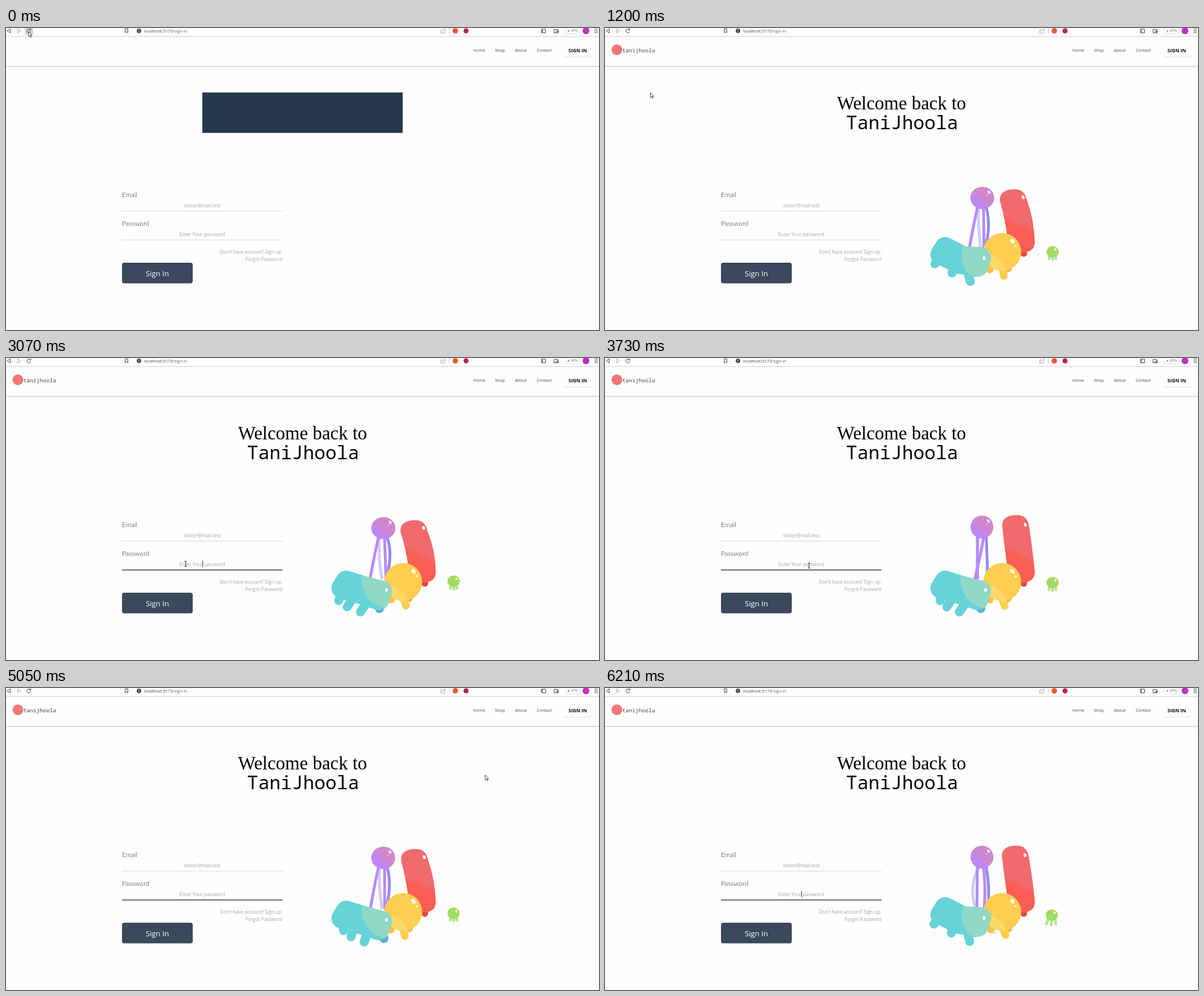
An HTML page for the animation above (6.31 s loop, 1048 by 534 pixels).

```html
<!DOCTYPE html>
<html lang="en">
<head>
<meta charset="utf-8">
<title>Sign in</title>
<style>
  html, body { margin: 0; width: 100%; height: 100%; overflow: hidden; background: #fefefe; }
  svg { display: block; width: 100vw; height: 100vh; }
  text { font-family: "Open Sans", "Noto Sans", sans-serif; white-space: pre; }
  .mono { font-family: "Noto Sans Mono", monospace; font-weight: 300; }
  .label { font: 300 11.8px Lato, sans-serif; fill: #2b2733; }
  .hint { font-size: 8.4px; fill: #9ca3af; }
  .nav { font-size: 7.4px; fill: #444; }
  .line { fill: none; stroke: #444; }
  .pale { stroke: #aaa; }
  .leg { fill: none; stroke-linecap: round; }
  .round { stroke-width: 36; stroke-linejoin: round; }
</style>
</head>
<body>
<svg viewBox="0 0 1048 534">
  <defs>
    <linearGradient id="redFill" gradientUnits="userSpaceOnUse" x1="732" y1="342" x2="728" y2="351">
      <stop stop-color="#f16a6d"/><stop offset="1" stop-color="#fa5d53"/>
    </linearGradient>
    <linearGradient id="purpleFill" x1=".2" y1=".8" x2=".5" y2=".5">
      <stop offset=".5" stop-color="#bf87f4"/><stop offset="1" stop-color="#ce87cd"/>
    </linearGradient>
    <linearGradient id="greenFill" x1="0" y1="1" x2="1" y2="0">
      <stop offset=".5" stop-color="#9fdd66"/><stop offset="1" stop-color="#b9d94a"/>
    </linearGradient>
    <clipPath id="titleBox"><rect x="347" y="108" width="354" height="84"/></clipPath>
    <clipPath id="ballClip"><circle cx="702" cy="396" r="33.5"/></clipPath>
    <mask id="tealMask" maskUnits="userSpaceOnUse" x="560" y="350" width="140" height="120">
      <path id="tealEdge" class="round" fill="#fff" stroke="#fff"/>
    </mask>
  </defs>

  <!-- browser bar -->
  <path d="M0 15.2H1048" stroke="#d4d4d6" stroke-width="1.2"/>
  <rect id="hover" x="33" y="-4" width="15" height="16" rx="2" fill="#d3d5d9"/>
  <path class="line" d="M7.5 1.5V8.5L2 5Z"/>
  <path class="line pale" d="M20.5 1.5V8.5L26 5Z"/>
  <path class="line" d="M43 3A3.4 3.4 0 1 0 43.6 6M43.8 1V3.7H41"/>
  <path class="line" d="M210.7 1.5H215.3V8.5L213 6.5L210.7 8.5Z"/>
  <circle cx="235" cy="5" r="3.9" fill="#444"/>
  <path d="M235 2.5V5.4M235 6.4V7.5" stroke="#fff"/>
  <text x="244" y="8" font-size="7.5" fill="#444">localhost:5173<tspan fill="#666">/sign-in</tspan></text>
  <path class="line pale" d="M771 3H768.5V9H775.5V7M770.5 6.5Q771 3.5 776 3.5M774 1L776.5 3.5L774 6"/>
  <path d="M783.5 0V10" stroke="#ccc"/>
  <circle cx="794" cy="5" r="4.8" fill="#f0552b"/>
  <circle cx="813" cy="5" r="4.5" fill="#b8234f"/>
  <path class="line" d="M946.5 2H953.5V8.5H946.5ZM948 2V8.5"/>
  <path class="line" d="M968.5 2.5H975V4H976V8.5H968.5ZM976 5.5H973V7H976"/>
  <rect x="988.5" y="-2" width="26" height="12.5" rx="6" fill="#fff" stroke="#ddd"/>
  <circle cx="994" cy="5" r="1.5" fill="#888"/>
  <text x="998" y="7.4" font-size="6.4" fill="#777">VPN</text>
  <circle cx="1025" cy="5" r="6" fill="#c02fc0"/>
  <path class="line" d="M1040 2H1046M1040 5H1046M1040 8H1046"/>

  <!-- site header -->
  <path d="M0 68H1048" stroke="#d9dadd" stroke-width="2"/>
  <g id="brand">
    <circle cx="21" cy="38.5" r="9.5" fill="#f27777"/>
    <text class="mono" x="30.5" y="43" font-size="9.7" fill="#444">tanijhoola</text>
  </g>
  <text class="nav" x="826" y="42">Home</text>
  <text class="nav" x="864" y="42">Shop</text>
  <text class="nav" x="899.5" y="42">About</text>
  <text class="nav" x="938" y="42">Contact</text>
  <rect x="986.5" y="30" width="49" height="22" rx="3" fill="#e2e2e4"/>
  <rect x="986" y="28" width="50" height="22.8" rx="3" fill="#fefefe"/>
  <text x="994" y="42.6" font-size="8.6" font-weight="700" fill="#111">SIGN IN</text>

  <!-- title -->
  <g clip-path="url(#titleBox)">
    <g id="title" text-anchor="middle">
      <text x="524" y="144" style="font:33px 'Liberation Serif',serif">Welcome back to</text>
      <text class="mono" x="525" y="179" font-size="33">TaniJhoola</text>
    </g>
    <rect id="cover" x="347" y="114" width="354" height="71.5" fill="#27374d"/>
  </g>

  <!-- form -->
  <text class="label" x="205" y="298.5">Email</text>
  <text class="hint" x="347" y="317" text-anchor="middle">visitor@mail.test</text>
  <path d="M205 323.7H488.5" stroke="#d3d5d9"/>
  <text class="label" x="205" y="349.5">Password</text>
  <text class="hint" x="347" y="367.5" text-anchor="middle">Enter Your password</text>
  <path id="field" d="M205 374.8H488.5"/>
  <path id="caret" d="M347.5 358.5V370" stroke="#333"/>
  <g class="hint" text-anchor="end">
    <text x="488.5" y="398.5">Don't have account! Sign up.</text>
    <text x="488.5" y="411.8">Forgot Password</text>
  </g>
  <rect x="205" y="415" width="125" height="36.5" rx="4" fill="#3b495c"/>
  <text x="267.5" y="439" font-size="13.2" fill="#fff" text-anchor="middle">Sign In</text>

  <!-- creatures -->
  <g id="art">
    <g class="leg" stroke-width="5">
      <path id="strand0" stroke="#cfccfa"/>
      <path id="strand1" stroke="#9289fa"/>
      <path id="strand2" stroke="#b78afa"/>
      <path id="strand3" stroke="#b78afa"/>
    </g>
    <ellipse id="head" fill="url(#purpleFill)"/>
    <g id="headShine" fill="#fff" opacity=".75">
      <ellipse cx="679" cy="291" rx="2.4" ry="3.3" transform="rotate(-35 679 291)"/>
      <circle cx="675.5" cy="296.5" r="1"/>
    </g>
    <path class="leg" d="M740 390V398.5" stroke="#dc4a47" stroke-width="12"/>
    <path id="red" fill="url(#redFill)"/>
    <ellipse id="redShine" rx="2.5" ry="3.4" fill="#fff"/>
    <ellipse id="puff" rx="5" ry="3" fill="#e8e6ea"/>
    <g class="leg" stroke-width="13.5">
      <path id="stub0" stroke="#f9b24c"/>
      <path id="stub1" stroke="#fbc048"/>
      <path id="stub2" stroke="#ffcd4f"/>
    </g>
    <circle cx="702" cy="396" r="33.5" fill="#ffcd4f"/>
    <circle cx="672" cy="440" r="39" fill="#fbd969" clip-path="url(#ballClip)"/>
    <g fill="#fff">
      <ellipse cx="720" cy="377" rx="3.3" ry="4.5" transform="rotate(-35 720 377)"/>
      <circle cx="726" cy="386" r="1.8"/>
    </g>
    <g class="leg" stroke="#67d3d8" stroke-width="16">
      <path id="foot3" stroke="#5eafd9"/>
      <path id="foot0"/><path id="foot1"/><path id="foot2"/>
    </g>
    <path id="teal" class="round" fill="#67d3d8" stroke="#67d3d8"/>
    <g mask="url(#tealMask)"><circle id="tealGlow" r="51.5" fill="#90d9c6"/></g>
    <ellipse id="tealShine" rx="2.5" ry="3.3" fill="#fff"/>
    <g class="leg" stroke="#b6e69c" stroke-width="5">
      <path id="arm0"/><path id="arm1"/><path id="arm2"/>
    </g>
    <ellipse id="jelly" rx="10.8" ry="10.2" fill="url(#greenFill)"/>
    <ellipse id="jellyShine" rx="1.7" ry="2.2" fill="#fff"/>
  </g>

  <g id="pointer" stroke-linejoin="round">
    <path id="arrow" d="M0 0V9L2 7.2L3.5 10.3L4.8 9.7L3.4 6.700H6Z" fill="#fff" stroke="#333" stroke-width=".9"/>
    <path id="beam" d="M-2 -4.5H2M0 -4.5V4.5M-2 4.5H2" fill="none" stroke="#333"/>
  </g>
</svg>
<script>
const LOOP = 6310;
const el = id => document.getElementById(id);
const set = (id, attrs) => { for (const k in attrs) el(id).setAttribute(k, attrs[k]); };
const show = (id, on) => set(id, { visibility: on ? 'inherit' : 'hidden' });
const line = (id, x1, y1, x2, y2) => set(id, { d: `M${x1} ${y1}L${x2} ${y2}` });
const clamp = x => Math.min(1, Math.max(0, x));
const wrap = x => x - Math.floor(x);
const phase = (t, period) => wrap((t - 1200) / period);
// swings between -1 and 1, reaching 1 at the given phase
const swing = (p, peak = 0) => Math.cos(2 * Math.PI * (p - peak));

const strands = [
  { top: 660, foot: 658.5, reach: 5.5, peak: 0, bow: -18, bowPeak: .72 },
  { top: 674, foot: 675, reach: 3, peak: .5, bow: 15, bowPeak: .85 },
  { top: 658, foot: 652.5, reach: 9, peak: .45, bow: 0, bowPeak: 0 },
  { top: 669, foot: 666, reach: 12, peak: .8, bow: 4, bowPeak: .5 }
];

function tallOnes(t) {
  const q = phase(t, 1920);
  strands.forEach((s, i) => {
    const x = s.foot + s.reach * swing(q, s.peak);
    const bow = s.bow * (.5 + .5 * swing(q, s.bowPeak)) ** 2;
    set('strand' + i, { d: `M${s.top} 318Q${(s.top + x) / 2 + bow} 350 ${x} 389` });
  });
  const up = Math.sin(Math.PI * wrap(phase(t, 960) + .04)) ** .7;
  set('head', { cx: 667 - up, cy: 301 - 2.5 * up, rx: 21.5 - 1.5 * up, ry: 19.5 + up });
  set('headShine', { transform: `translate(${-1.5 * up} ${-3 * up})` });

  const x = 697 + 6 * up, y = 288 - 11.5 * up;
  set('red', { d: `M712 395L710 362Q706 335 ${x} ${y + 22}C${x - 3} ${y + 5} ${x + 12} ${y} ${x + 23} ${y}` +
    `C${x + 38} ${y - 1} ${x + 44} ${y + 6} ${x + 47} ${y + 18}Q${759 - 4 * up} 338 759.5 376Q761 395 740 397Z` });
  set('redShine', { transform: `translate(${737.5 + 6 * up} ${301 - 7 * up}) rotate(-20)` });
}

function ball(t) {
  const p = phase(t, 640);
  line('stub0', 711, 415, 716 + 4 * swing(p, .45), 425);
  line('stub1', 683, 415, 684 + 4 * swing(p, .5), 427);
  line('stub2', 700, 418, 704 + 4 * swing(p, .8), 435 + 3.5 * swing(p));
  show('puff', p > .45 && p < .88);
  set('puff', { cx: 743 - 66 * p, cy: 455 - 27 * p });
}

// centres of the body's rounded corners; the two in the middle stay put when it bends
const body = [[601, 394], [633, 404], [664, 412], [659, 428], [626, 417], [593, 407]];
const feet = [
  { hip: 595, x: 588, reach: 8.5, peak: .35, y: 429, lift: 12 },
  { hip: 616, x: 609, reach: 6, peak: .12, y: 440, lift: 7 },
  { hip: 640, x: 636, reach: 10, peak: .05, y: 449, lift: 1 },
  { hip: 657, x: 660, reach: 8, peak: .35, y: 443, lift: 11 }
];

function teal(t) {
  const p = phase(t, 720), bend = Math.max(0, swing(p));
  const d = 'M' + body.map(([x, y], i) => [x, y - (i % 3 === 1 ? 0 : 6.5 * bend)]).join('L') + 'Z';
  set('teal', { d });
  set('tealEdge', { d });
  feet.forEach((f, i) =>
    line('foot' + i, f.hip, f.y - 20 - f.lift * bend, f.x + f.reach * swing(p, f.peak), f.y - f.lift * bend));
  set('tealGlow', { cx: 680 + 2 * bend, cy: 392 + 10 * bend });
  set('tealShine', { cx: 672.5 - 2.5 * bend, cy: 410 - 3 * bend });
}

// drops fast, then floats up while its arms fold
function jelly(t) {
  const p = wrap(phase(t, 1440) - .3), open = clamp(1.5 - 4 * p);
  const x = 791 - 2 * open, y = 394 + 13 * Math.exp(-3 * p);
  set('jelly', { cx: x, cy: y });
  set('jellyShine', { cx: x + 5, cy: y - 4 });
  for (let i = -1; i < 2; i++)
    line('arm' + (i + 1), x + 5 * i, y + 4, x - open + (6 + 3 * open) * i, y + 14 + 4 * open - 1.5 * i * i);
}

function page(t) {
  const slide = clamp((t - 100) / 500), rise = 1 - (1 - clamp((t - 350) / 500)) ** 2;
  set('cover', { x: 347 + 354 * slide ** 1.8 });
  set('title', { transform: `translate(0 ${50 * (1 - rise)})`, opacity: rise });
  show('art', t >= 120);
  show('brand', t >= 120);
  show('hover', t < 840);
  const focus = t >= 2830;
  set('field', { stroke: focus ? '#334155' : '#d3d5d9', 'stroke-width': focus ? 1.6 : 1 });
  show('caret', t >= 2980 && Math.floor((t - 2980) / 530) % 2 === 0);
}

// time, x, y
const stops = [[0, 40, 6], [720, 40, 6], [1200, 80, 114], [2160, 283, 317], [2800, 317.5, 364],
  [3310, 317.5, 364], [4390, 428, 372], [5050, 846.5, 154], [5320, 928, 100], [LOOP, 928, 100]];

function pointer(t) {
  const i = stops.findLastIndex(s => s[0] <= t), a = stops[i], b = stops[i + 1];
  const [, x, y] = a.map((v, k) => v + (b[k] - v) * (t - a[0]) / (b[0] - a[0]));
  const typing = x > 205 && x < 488 && (y > 304 && y < 325 || y > 354 && y < 376);
  show('pointer', t < 5500);
  set('pointer', { transform: `translate(${x} ${y})` });
  show('arrow', !typing);
  show('beam', typing);
}

const start = performance.now();
function draw() {
  const t = (performance.now() - start) % LOOP;
  for (const part of [page, tallOnes, ball, teal, jelly, pointer]) part(t);
  requestAnimationFrame(draw);
}
draw();
</script>
</body>
</html>
```
